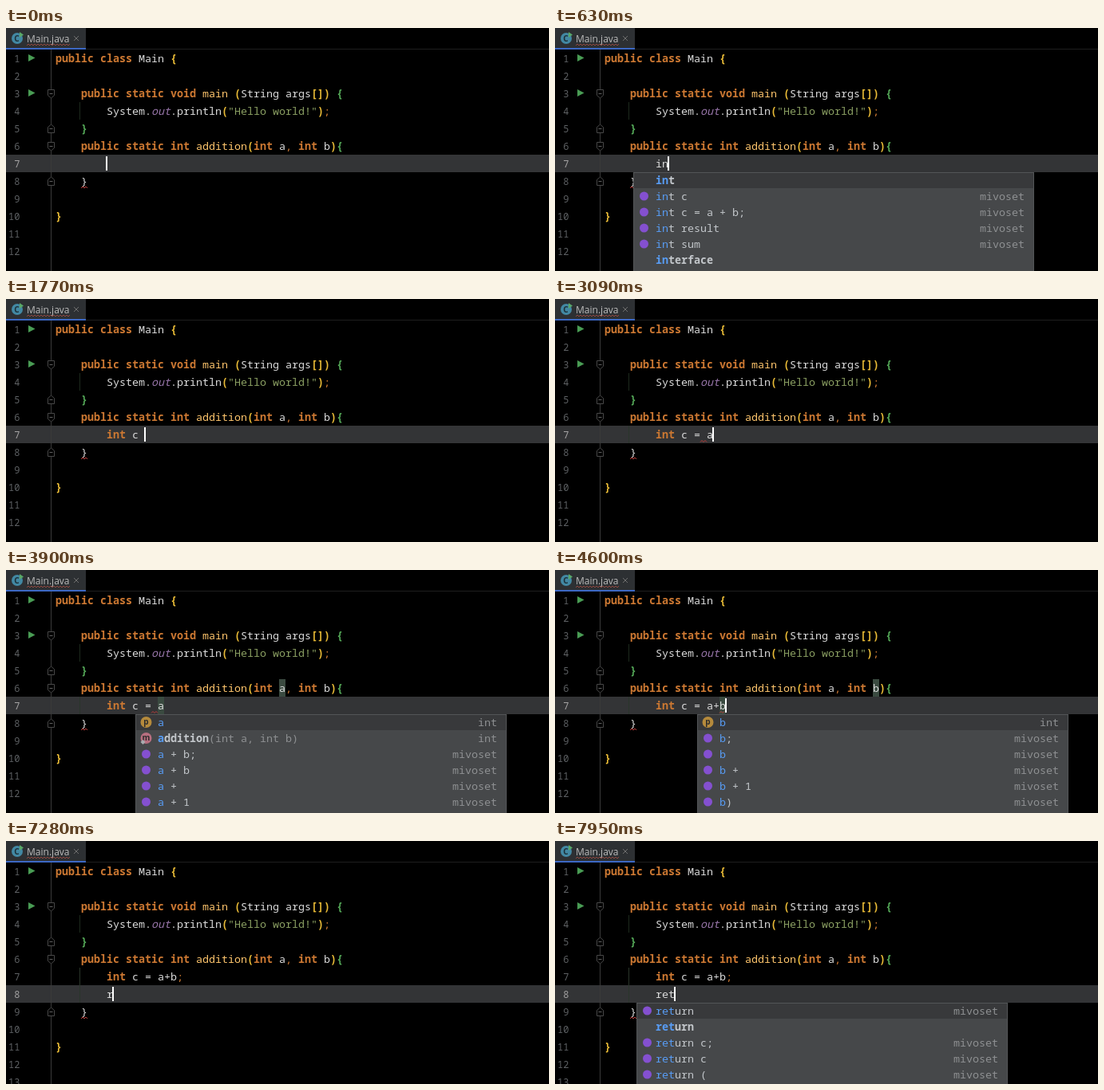
These frames come from a looping animation (680 px wide and 305 px high, 8000 ms). An HTML page with a canvas:

```html
<!DOCTYPE html>
<html lang="en">
<head>
<meta charset="utf-8">
<title>Typing a method</title>
<style>
  html, body { margin: 0; width: 100%; height: 100%; overflow: hidden; background: #000; }
  canvas { display: block; }
</style>
</head>
<body>
<canvas id="stage" width="680" height="305"></canvas>
<script>
const ctx = document.getElementById('stage').getContext('2d');
const LOOP = 8000, CHAR = 8, LINE = 22, INDENT = 126;
const MONO = '"Noto Sans Mono", "DejaVu Sans Mono", monospace';
const SANS = '"Open Sans", "Noto Sans", sans-serif';
const HELPER = 'mivoset';

// style letter -> colour, font prefix
const STYLES = {
  k: ['#cc7832', 'bold '], t: ['#dcdcdc', '500 '], f: ['#ffc66d', '500 '], y: ['#e8ba36', '600 '],
  g: ['#54a857', '600 '], s: ['#8a9f62', '500 '], o: ['#9876aa', 'italic 500 '], c: ['#cc7832', '500 ']
};

// [line, x, styled pieces]
const FIXED = [
  [1, 62, 'kpublic class |tMain |y{'],
  [3, 94, 'kpublic static void |fmain |y(|tString args|y[])| |g{'],
  [4, 126, 'tSystem.|oout|t.println|y(|s"Hello world!"|y)|c;'],
  [5, 94, 'g}'],
  [6, 94, 'kpublic static int |faddition|y(|kint |ta|c, |kint |tb|y)|g{']
];

// rows: [icon, text, right label, tail]
const helperRows = list => list.map(text => ['h', text, HELPER]);
const MENUS = {
  int: { col: 0, gap: 28, width: 502, rows: [['', 'int', ''], ...helperRows(['int c', 'int c = a + b;', 'int result', 'int sum']), ['', 'interface', '']] },
  c: { col: 4, gap: 24, width: 465, rows: helperRows(['c = a + b;', 'c = a', 'c =', 'c;', 'c = 0;', 'c']) },
  a: { col: 8, gap: 28, width: 465, rows: [['p', 'a', 'int'], ['m', 'addition', 'int', '(int a, int b)'], ...helperRows(['a + b;', 'a + b', 'a +', 'a + 1', 'a'])] },
  b: { col: 10, gap: 28, width: 465, rows: [['p', 'b', 'int'], ...helperRows(['b;', 'b', 'b +', 'b + 1', 'b)', 'b - 1'])] },
  r: { col: 0, gap: 24, width: 465, rows: helperRows(['return', 'return c;', 'return a+b;', 'return c', 'return a']) },
  ret: { col: 0, gap: 24, width: 465, rows: [['h', 'return', HELPER], ['', 'return', ''], ...helperRows(['return c;', 'return c', 'return ('])] }
};

// Each step changes part of the state; wave is [first, last] x of the error line
const STEPS = [
  [0, { line: 7, code: '', caret: true, braceError: true, guide: false, menu: null, mark: null, wave: null }],
  [400, { code: 'i' }],
  [460, { menu: 'int' }],
  [570, { code: 'in' }],
  [740, { code: 'int' }],
  [1170, { code: 'int ', menu: null }],
  [1470, { code: 'int c' }],
  [1500, { menu: 'c' }],
  [1770, { code: 'int c ', menu: null }],
  [1940, { code: 'int c =' }],
  [2240, { wave: [182, 189], guide: true }],
  [2750, { code: 'int c = ', wave: [182, 197] }],
  [3090, { code: 'int c = a', wave: [182, 190] }],
  [3190, { menu: 'a', mark: 'a' }],
  [3900, { caret: false }],
  [4100, { code: 'int c = a+', caret: true, menu: null, wave: [206, 213] }],
  [4130, { mark: null }],
  [4430, { code: 'int c = a+b' }],
  [4530, { menu: 'b', mark: 'b' }],
  [4630, { braceError: false, wave: [214, 221] }],
  [5380, { code: 'int c = a+b;', menu: null, mark: null, wave: [222, 229] }],
  [5720, { wave: null, braceError: true }],
  [6410, { caret: false }],
  [6610, { line: 8, code: '', caret: true, guide: false }],
  [6910, { guide: true }],
  [7280, { code: 'r' }],
  [7350, { menu: 'r' }],
  [7620, { code: 're' }],
  [7650, { menu: 'ret' }],
  [7950, { code: 'ret' }]
];

const middle = line => 16 + LINE * line;

function box(x, y, w, h, color) {
  ctx.fillStyle = color;
  ctx.fillRect(x, y, w, h);
}

function text(str, x, y, color, font, align = 'left') {
  ctx.font = font;
  ctx.fillStyle = color;
  ctx.textAlign = align;
  ctx.fillText(str, x, y);
}

const codeFont = (prefix = '500 ') => `${prefix}13.333px ${MONO}`;

function pieces(line, x, styled) {
  for (const piece of styled.split('|')) {
    const str = piece.slice(1);
    const [color, prefix] = STYLES[piece[0]] || STYLES.t;
    text(str, x, middle(line) + 5, color, codeFont(prefix));
    x += CHAR * (str.length || 1);
  }
}

function path(points, { fill, stroke, close = true }) {
  ctx.beginPath();
  points.forEach(([x, y]) => ctx.lineTo(x, y));
  if (close) ctx.closePath();
  if (fill) { ctx.fillStyle = fill; ctx.fill(); }
  if (stroke) { ctx.strokeStyle = stroke; ctx.lineWidth = 1; ctx.stroke(); }
}

function disc(x, y, r, color) {
  ctx.fillStyle = color;
  ctx.beginPath();
  ctx.arc(x, y, r, 0, 7);
  ctx.fill();
}

function wave(from, to, y, color = '#bc3f3c') {
  const points = [];
  for (let x = from, i = 0; x <= to; x += 2, i++) points.push([x, y + (i % 2 ? -1 : 1)]);
  path(points, { stroke: color, close: false });
}

function fold(line, dir) {
  const y = middle(line) + .5;
  const shape = [[-4, -5], [4, -5], [4, 2], [0, 5.5], [-4, 2]].map(([dx, dy]) => [56.5 + dx, y + dir * dy]);
  path(shape, { fill: '#000', stroke: '#484848' });
  box(54.5, y - .5, 4, 1, '#606060');
}

function tab() {
  box(0, 26, 680, 1, '#1e1e1e');
  box(0, 0, 100, 26, '#2d3033');
  box(0, 25, 100, 2, '#3c68c4');
  disc(14, 13, 7, '#4288a3');
  text('C', 13.5, 17, '#1d3038', `bold 10px ${SANS}`, 'center');
  path([[17, 5], [22, 8.5], [17, 12]], { fill: '#59a869' });
  text('Main.java', 26, 18, '#bbbbbb', `12px ${SANS}`);
  wave(26, 81, 21, '#93483f');
  path([[85, 10], [91, 16]], { stroke: '#6e6e6e', close: false });
  path([[91, 10], [85, 16]], { stroke: '#6e6e6e', close: false });
}

function gutter(active, endLine) {
  for (let n = 1; n <= endLine + 4; n++)
    text(n, 17.5, middle(n) + 5, n === active ? '#a4a3a3' : '#5d6063', `12px ${MONO}`, 'right');
  box(56, 27, 1, 278, '#3a3a3a');
  for (const n of [1, 3]) {
    const y = middle(n) - .5;
    path([[28, y - 4.5], [36.5, y], [28, y + 4.5]], { fill: '#499c54' });
  }
  [3, 6].forEach(n => fold(n, 1));
  [5, endLine].forEach(n => fold(n, -1));
}

function icon(kind, x, y) {
  if (kind === 'h') disc(x, y, 5.5, '#8450d0');
  if (kind !== 'p' && kind !== 'm') return;
  disc(x, y, 7, kind === 'p' ? '#b58a3c' : '#b86f80');
  text(kind, x, y + 3, '#2b2b2b', `bold 10px ${SANS}`, 'center');
  if (kind === 'm') path([[-7, 5], [-4, 2], [-1, 5], [-4, 8]].map(([dx, dy]) => [x + dx, y + dy]), { fill: '#a9adb0' });
}

function popup(menu, top, typed) {
  const textX = INDENT + menu.col * CHAR, x = textX - menu.gap;
  box(x, top, menu.width, 305 - top, '#535557');
  box(x + 1, top + 1, menu.width - 2, 305 - top, '#46484a');
  box(x + 1, top + 1, menu.width - 2, 19, '#38393b');
  menu.rows.forEach(([kind, label, right, tail = ''], i) => {
    const y = top + 10 + 20 * i, base = y + 5;
    const font = codeFont(!kind || kind === 'm' ? 'bold ' : undefined);
    const rest = textX + typed * CHAR;
    icon(kind, x + 13.5, y);
    text(label.slice(0, typed), textX, base, '#589df6', font);
    text(label.slice(typed), rest, base, '#c3c7cb', font);
    text(tail, textX + label.length * CHAR, base, '#8e9092', codeFont());
    text(right, x + menu.width - 12, base, '#8e9092', codeFont(), 'right');
  });
}

function statement(line, code) {
  const bold = code.startsWith('int') ? 3 : 0;
  const end = code.endsWith(';') ? code.length - 1 : code.length;
  const parts = [];
  if (bold) parts.push('kint');
  if (end > bold) parts.push('t' + code.slice(bold, end));
  if (end < code.length) parts.push('c;');
  if (parts.length) pieces(line, INDENT, parts.join('|'));
}

function draw(time) {
  const s = Object.assign({}, ...STEPS.filter(([at]) => at <= time).map(([, change]) => change));
  const y = middle(s.line), endLine = s.line + 1;

  box(0, 0, 680, 305, '#000');
  box(0, y - 11, 680, LINE, '#333436');
  tab();
  gutter(s.line, endLine);

  box(92, middle(4) - 11, 1, LINE, '#1d2a1d');
  if (s.guide) box(92, middle(7) - 11, 1, LINE * (s.line - 6), '#2a352a');
  if (s.mark) {
    box(s.mark === 'a' ? 342 : 398, middle(6) - 11, CHAR, LINE, '#3a4a40');
    box(s.mark === 'a' ? 190 : 206, y - 11, CHAR, LINE, '#3a4a40');
  }

  FIXED.forEach(row => pieces(...row));
  if (s.line === 8) statement(7, 'int c = a+b;');
  statement(s.line, s.code);
  pieces(endLine, 94, s.braceError ? 't}' : 'g}');
  pieces(endLine + 2, 62, 'y}');

  if (s.braceError) wave(94, 102, middle(endLine) + 8);
  if (s.wave) wave(...s.wave, y + 8.5);
  if (s.caret) box(INDENT - 1 + s.code.length * CHAR, y - 9, 2, 18, '#fff');
  if (s.menu) {
    const menu = MENUS[s.menu];
    popup(menu, y + 11, Math.min(s.code.length - menu.col, 3));
  }
}

const start = performance.now();
function tick() {
  draw((performance.now() - start) % LOOP);
  requestAnimationFrame(tick);
}
tick();
</script>
</body>
</html>
```
